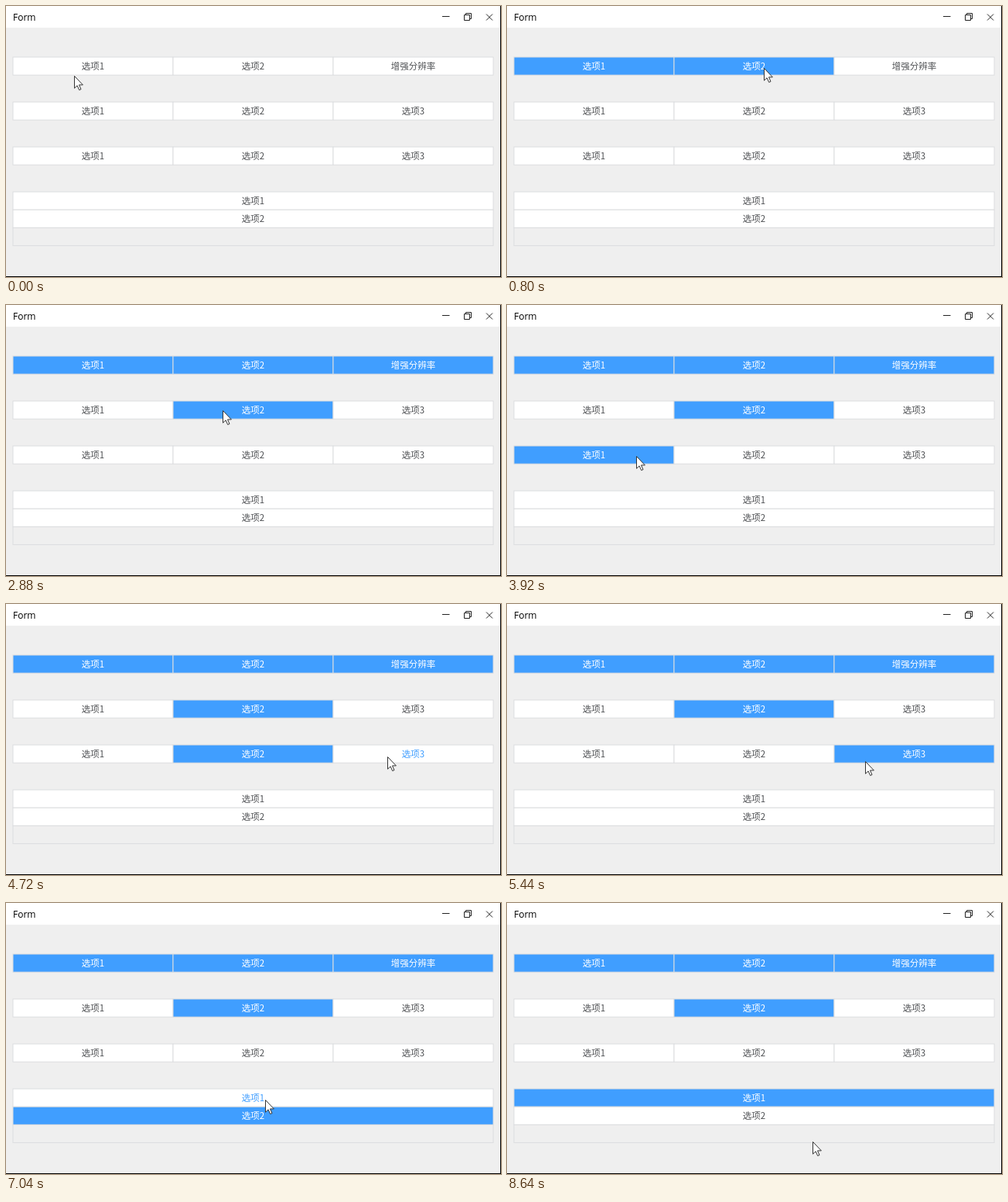
An HTML page with a canvas that plays this animation: 640x350 px, repeating every 8800 ms.

```html
<!DOCTYPE html>
<html lang="zh">
<head>
<meta charset="utf-8">
<title>Form</title>
<style>
  html, body { margin: 0; width: 100%; height: 100%; overflow: hidden; }
  canvas { display: block; }
</style>
</head>
<body>
<canvas id="stage" width="640" height="350"></canvas>
<script>
const ctx = document.getElementById('stage').getContext('2d');
const LOOP = 8800, STEP = 80;
const BLUE = '#409eff', BORDER = '#dcdddf', BACK = '#efefef';
const CJK = '11.5px "Noto Sans CJK SC", "Noto Sans CJK", sans-serif';
const LATIN = '12px "Open Sans", "Noto Sans", sans-serif';
const LEFT = 9, TOP = 66, WIDTH = 621, ROW_GAP = 58, CELL_HEIGHT = 23.2;

// Four groups of three cells; the last one is stacked.
const groups = [
  ['选项1', '选项2', '增强分辨率'],
  ['选项1', '选项2', '选项3'],
  ['选项1', '选项2', '选项3'],
  ['选项1', '选项2', '']
].map((labels, row) => {
  const stacked = row === 3, w = stacked ? WIDTH : WIDTH / 3;
  return labels.map((label, i) => ({
    label, w, h: CELL_HEIGHT,
    x: LEFT + (stacked ? 0 : i * w),
    y: TOP + row * ROW_GAP + (stacked ? i * CELL_HEIGHT : 0)
  }));
});
const cells = groups.flat();

const at = (time, x, y) => ({ time, x, y });
const click = (time, x, y) => ({ time, x, y, click: true });
const stops = [
  at(0, 88, 90),
  click(320, 115, 80), click(720, 312, 80), click(1120, 505, 80),
  at(1680, 412, 146), click(2080, 332, 138), at(2720, 280, 136), at(2880, 280, 136),
  click(3680, 125, 195), click(4480, 320, 196), at(4720, 493, 197), click(5040, 516, 195),
  at(5440, 463, 203), click(5680, 478, 196), click(6240, 372, 270),
  at(7040, 335, 254), click(7200, 336, 247), at(8400, 338, 246), at(8640, 395, 308)
];

const contains = ({ x, y, w, h }, point) =>
  point.x >= x && point.x < x + w && point.y >= y && point.y < y + h;

function pointerAt(time) {
  const next = stops.findIndex(stop => stop.time > time);
  if (next < 0) return stops[stops.length - 1];
  const a = stops[next - 1], b = stops[next];
  const k = (time - a.time) / (b.time - a.time), ease = k * k * (3 - 2 * k);
  return {
    x: Math.round(a.x + (b.x - a.x) * ease),
    y: Math.round(a.y + (b.y - a.y) * ease)
  };
}

// A click toggles its cell; only the first group allows several choices.
function selectionAt(time) {
  const selected = new Set();
  for (const stop of stops.filter(s => s.click && s.time <= time)) {
    const cell = cells.find(c => contains(c, stop));
    const group = groups.find(g => g.includes(cell));
    const wasOn = selected.has(cell);
    if (group !== groups[0]) group.forEach(c => selected.delete(c));
    if (wasOn) selected.delete(cell); else selected.add(cell);
  }
  return selected;
}

function rect(color, x, y, w, h) {
  ctx.fillStyle = color;
  ctx.fillRect(x, y, w, h);
}

function stroke(shape, color) {
  ctx.strokeStyle = color;
  ctx.stroke(new Path2D(shape));
}

function text(string, font, color, align, x, y) {
  ctx.font = font;
  ctx.fillStyle = color;
  ctx.textAlign = align;
  ctx.fillText(string, x, y);
}

function drawWindow() {
  rect(BACK, 0, 0, 640, 350);
  rect('#fff', 0, 0, 640, 28);
  text('Form', LATIN, '#000', 'left', 9, 19);
  stroke('M564 13.5H573.5M592.5 11.5H599.5V18.5H592.5ZM594.5 11V9.5H601.5V16.5H600', '#222');
  stroke('M621 10.5L629 18.5M629 10.5L621 18.5', '#222');
  rect('#000', 639, 0, 1, 350);
  rect('#000', 0, 349, 640, 1);
}

function drawCell({ label, x, y, w, h }, on, hovered) {
  rect(on ? BLUE : label ? '#fff' : BACK, x, y, w, h);
  ctx.strokeStyle = BORDER;
  ctx.strokeRect(x, y, w, h);
  const color = on ? '#fff' : hovered ? BLUE : '#505255';
  text(label, CJK, color, 'center', x + w / 2, y + 16);
}

const arrow = new Path2D('M.5 .5V16.2L4.1 12.8L6.7 18.5L9 17.5L6.5 11.9H11.4Z');

function drawPointer({ x, y }) {
  ctx.save();
  ctx.translate(x, y);
  ctx.fillStyle = '#fff';
  ctx.fill(arrow);
  ctx.strokeStyle = '#333';
  ctx.stroke(arrow);
  ctx.restore();
}

function draw(now) {
  const time = Math.floor(now % LOOP / STEP) * STEP;
  const pointer = pointerAt(time), selected = selectionAt(time);
  drawWindow();
  for (const cell of cells) drawCell(cell, selected.has(cell), contains(cell, pointer));
  drawPointer(pointer);
}

const start = performance.now();
function frame() {
  draw(performance.now() - start);
  requestAnimationFrame(frame);
}
frame();
</script>
</body>
</html>
```
